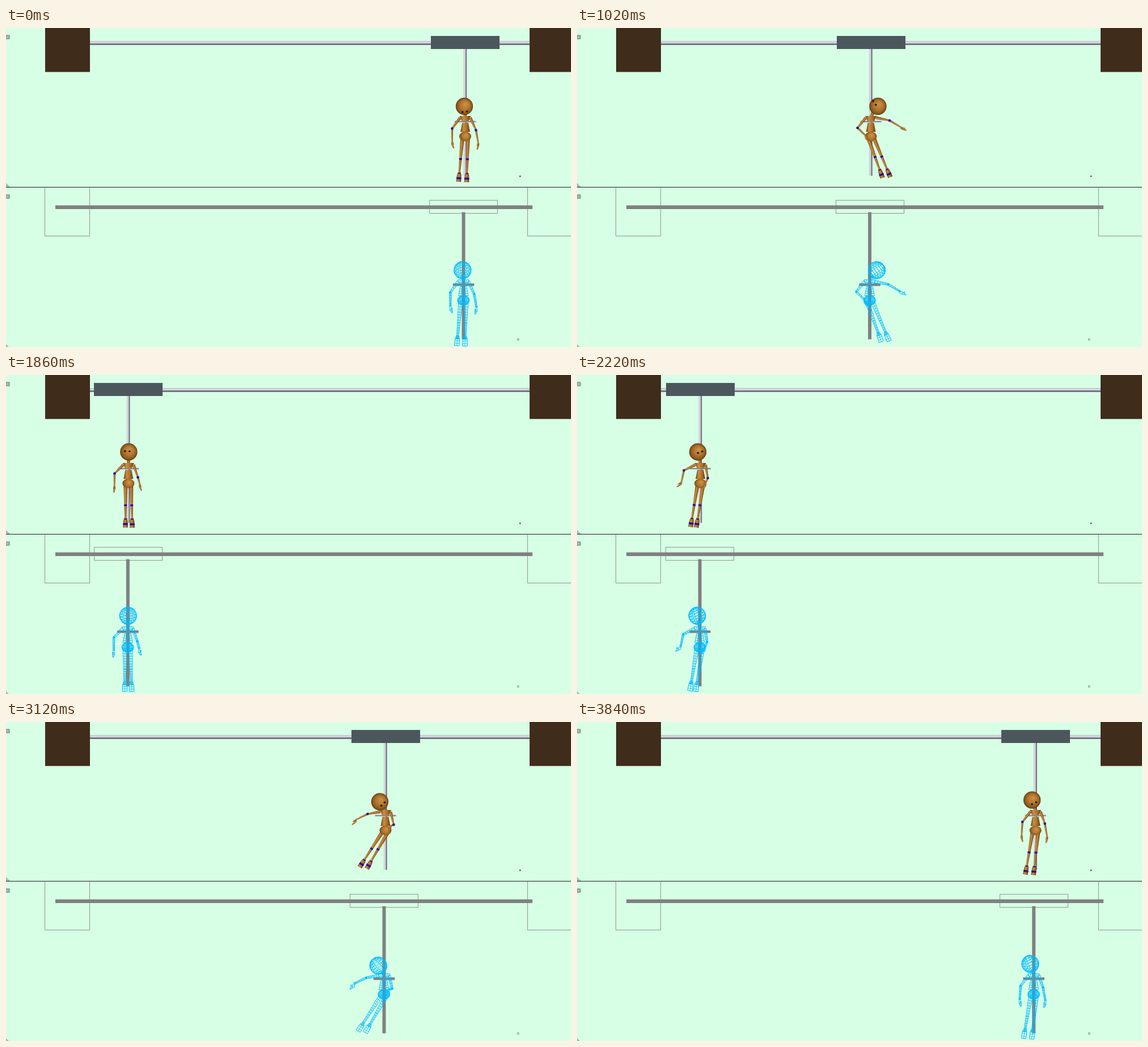
An HTML page with a canvas that plays this animation: 996 px wide and 562 px high, repeating every 3.9 s.

```html
<!DOCTYPE html>
<html lang="en">
<head>
<meta charset="utf-8">
<title>Puppet on a sliding carriage</title>
<style>
html, body { margin: 0; width: 100%; height: 100%; overflow: hidden; background: #d7ffe5; }
canvas { display: block; }
</style>
</head>
<body>
<canvas id="stage" width="996" height="562"></canvas>
<script>
const ctx = document.getElementById('stage').getContext('2d');
const STEP = 60, STEPS = 65;
const GREY = '#808080', WIRE = '#00b9ff', PURPLE = '#2c0c9c';
const WOOD = ['#6f4514', '#c98d42', '#a96f2b', '#5f390f'];
const METAL = ['#a3a3ae', '#e9e9f4', '#c3c3cf', '#737380', '#676772'];

// Times are counted in steps of 60 ms.
const SLIDE = [[0, 809.5], [4, 808.6], [8, 792], [9, 782.5], [13, 702], [17, 518], [18, 437.5],
  [21, 311], [25, 235.5], [27, 224], [32, 215.3], [37, 217.5], [45, 265.5], [48, 377],
  [50, 530], [52, 669], [54, 749.5], [58, 800], [63, 807.5], [64, 808.2]];

// Per pose: head xy, face offset xy, left elbow xy, left wrist xy, left hand dx,
// right elbow xy, right wrist xy, right hand dx, left ankle xy, right ankle x.
const POSE_TIMES = [0, 8, 17, 25, 37, 52, 64];
const POSES = [
  [-1.5, 138, 0.7, 9.5, -23, 177, -23, 201, 3, 19, 180, 23, 203, -2, -10.5, 257, 3],
  [4.5, 141.5, -6.5, 9.5, -20.5, 177, -9, 189, 5, 26.5, 174, 29.5, 195, 9, 0.5, 256, 14.5],
  [12.5, 138, -6, -6, -23.5, 176, -9, 190, 5, 33, 163, 53, 175, 10, 16, 251, 29],
  [6.5, 135.5, -8.5, -3, -20.5, 177.5, -16.5, 200, 6, 23.5, 177, 37.5, 194, 11, 4.5, 255, 18],
  [-4.5, 135.5, 4, 0.5, -29, 168, -33.5, 189, -8, 13, 181.5, 9, 191, -5, -15, 254, -5],
  [-10, 140.5, 5.5, 4, -31.5, 162, -52, 172, -7, 14.5, 181, 9, 183, -5, -38, 244, -26],
  [-6, 137.5, 3.5, 5.5, -23, 176, -24.5, 200, 2, 16.5, 179, 20.5, 202, -2, -15.5, 255, -2]
];

// Monotone cubic through the points, at rest at both ends.
function curve(times, values, t) {
  const slope = i => (values[i + 1] - values[i]) / (times[i + 1] - times[i]);
  const tangent = i => {
    if (i === 0 || i === times.length - 1) return 0;
    const a = slope(i - 1), b = slope(i);
    return a * b <= 0 ? 0 : 2 * a * b / (a + b);
  };
  let i = 0;
  while (i < times.length - 2 && t > times[i + 1]) i++;
  const span = times[i + 1] - times[i], u = (t - times[i]) / span, v = 1 - u;
  return v * v * (1 + 2 * u) * values[i] + u * u * (3 - 2 * u) * values[i + 1]
    + span * u * v * (v * tangent(i) - u * tangent(i + 1));
}

function rect(x, y, w, h, fill) {
  ctx.fillStyle = fill;
  ctx.fillRect(x, y, w, h);
}

function outline(x, y, w, h) {
  ctx.strokeStyle = '#8b9a91';
  ctx.lineWidth = 1;
  ctx.strokeRect(x, y, w, h);
}

function line(points, color, width) {
  ctx.strokeStyle = color;
  ctx.lineWidth = width;
  ctx.beginPath();
  points.forEach(p => ctx.lineTo(...p));
  ctx.stroke();
}

function ramp(x0, y0, x1, y1, colors) {
  const g = ctx.createLinearGradient(x0, y0, x1, y1);
  colors.forEach((c, i) => g.addColorStop(i / (colors.length - 1), c));
  return g;
}

const mix = (a, b, u) => [a[0] + (b[0] - a[0]) * u, a[1] + (b[1] - a[1]) * u];

// Tapered segment from a to b, shaded or as a mesh.
function limb(a, b, wa, wb, wire, colors = WOOD) {
  const dx = b[0] - a[0], dy = b[1] - a[1], len = Math.hypot(dx, dy) || 1;
  const nx = dy / len / 2, ny = -dx / len / 2;
  const side = (u, s) => {
    const p = mix(a, b, u), w = (wa + (wb - wa) * u) * s;
    return [p[0] + nx * w, p[1] + ny * w];
  };
  const shape = [side(0, -1), side(0, 1), side(1, 1), side(1, -1), side(0, -1)];
  if (!wire) {
    const w = Math.max(wa, wb);
    ctx.fillStyle = ramp(a[0] - nx * w, a[1] - ny * w, a[0] + nx * w, a[1] + ny * w, colors);
    ctx.beginPath();
    shape.forEach(p => ctx.lineTo(...p));
    ctx.fill();
    return;
  }
  line(shape, WIRE, 1);
  const columns = Math.max(2, Math.round(Math.max(wa, wb) / 4)), rows = Math.ceil(len / 5);
  for (let i = 1; i < columns; i++) {
    const s = 2 * i / columns - 1;
    line([side(0, s), side(1, s)], WIRE, 0.8);
  }
  for (let i = 1; i < rows; i++) line([side(i / rows, -1), side(i / rows, 1)], WIRE, 0.8);
}

function ball(x, y, rx, ry, tilt, pitch, wire) {
  ctx.save();
  ctx.translate(x, y);
  const ellipse = (cy, a, b) => {
    ctx.beginPath();
    ctx.ellipse(0, cy, Math.abs(a), Math.abs(b), 0, 0, 7);
  };
  if (wire) {
    ctx.rotate(tilt);
    ctx.strokeStyle = WIRE;
    ctx.lineWidth = 0.8;
    for (let i = 0; i < 6; i++) {
      ellipse(0, rx * Math.cos(i * Math.PI / 12), ry);
      ctx.stroke();
    }
    for (let i = -4; i <= 4; i++) {
      const lat = i * Math.PI / 10, r = Math.cos(lat);
      ellipse(ry * Math.sin(lat) * Math.cos(pitch), rx * r, ry * r * Math.sin(pitch));
      ctx.stroke();
    }
  } else {
    const g = ctx.createRadialGradient(rx * 0.15, -ry * 0.25, 1, 0, 0, rx);
    g.addColorStop(0, '#cb8f45');
    g.addColorStop(0.5, '#b1762f');
    g.addColorStop(0.85, '#8a581d');
    g.addColorStop(1, '#5d390f');
    ctx.fillStyle = g;
    ellipse(0, rx, ry);
    ctx.fill();
  }
  ctx.restore();
}

function dot(p, r, color) {
  ctx.fillStyle = color;
  ctx.beginPath();
  ctx.arc(p[0], p[1], r, 0, 7);
  ctx.fill();
}

function leg(hip, ankle, wire) {
  const knee = mix(hip, ankle, 0.59);
  const length = Math.hypot(ankle[0] - knee[0], ankle[1] - knee[1]);
  const along = d => mix(knee, ankle, 1 + d / length);
  limb(hip, knee, 7, 4.5, wire);
  limb(knee, ankle, 4.5, 3, wire);
  limb(along(-3), along(2), 5, 7, wire);
  limb(along(1), along(14), 7.5, 8.5, wire);
  if (wire) return;
  limb(mix(hip, ankle, 0.565), mix(hip, ankle, 0.615), 5, 5, false, [PURPLE, PURPLE]);
  limb(along(-2), along(0), 4, 4, false, [PURPLE, PURPLE]);
  limb(along(6), along(9.5), 8.5, 8.5, false, [PURPLE, PURPLE]);
}

function arm(shoulder, elbow, wrist, handX, wire) {
  const handY = Math.sqrt(Math.max(9, 132 - handX * handX));
  const tip = [wrist[0] + handX, wrist[1] + handY];
  const bend = [wrist[0] + handX * 0.25, wrist[1] + handY * 0.5];
  const thumb = [wrist[0] + handX * 0.8, wrist[1] + handY * 0.4];
  limb(shoulder, elbow, 5, 3, wire);
  limb(elbow, wrist, 3.5, 2.5, wire);
  if (wire) {
    [[wrist, 1.5], [bend, 2], [mix(bend, tip, 0.5), 1.5], [tip, 1], [thumb, 1]].forEach(([p, r]) => {
      ctx.strokeStyle = WIRE;
      ctx.lineWidth = 0.8;
      ctx.strokeRect(p[0] - r, p[1] - r, 2 * r, 2 * r);
    });
    dot(elbow, 2, WIRE);
    return;
  }
  limb(wrist, bend, 3.5, 4, false);
  limb(bend, tip, 3, 2, false);
  limb(wrist, thumb, 2, 1.5, false);
  dot(elbow, 2.3, PURPLE);
}

function puppet(x, y, pose, wire) {
  const [hx, hy, fx, fy, elx, ely, wlx, wly, handL, erx, ery, wrx, wry, handR, alx, aly, arx] = pose;
  const tilt = hx * 0.075;
  ctx.save();
  ctx.translate(x, y);
  leg([-5, 193], [alx, aly], wire);
  leg([5, 193], [arx, aly - alx * 0.06], wire);
  limb([hx * 0.4, hy + 10], [0, 157], 5, 5, wire);
  limb([0, 155], [0, 164], 20, 12, wire);
  limb([0, 167], [0, 183], 11, 17, wire);
  ball(0, 191, 10.5, 8.5, 0, 0.25, wire);
  arm([-9, 158], [elx, ely], [wlx, wly], handL, wire);
  arm([9, 158], [erx, ery], [wrx, wry], handR, wire);
  ball(hx, hy, 15.2, 15.2, tilt, 0.25 + Math.abs(fy) * 0.04, wire);
  if (!wire) {
    const ex = 4 * Math.cos(tilt), ey = 4 * Math.sin(tilt);
    dot([hx + fx - ex, hy + fy - ey], 1.8, '#1c1206');
    dot([hx + fx + ex, hy + fy + ey], 1.8, '#1c1206');
  }
  ctx.restore();
}

function panelMarks(badgeY, cornerY) {
  ctx.fillStyle = '#96a89d';
  ctx.beginPath();
  ctx.roundRect(-3, badgeY, 10, 8, 2);
  ctx.fill();
  rect(1, badgeY + 3, 3, 2, '#b3c8bc');
  for (let i = 2; i <= 6; i += 2) line([[0, cornerY - i], [i, cornerY]], '#56635c', 0.8);
}

function draw(step) {
  const x = curve(SLIDE.map(k => k[0]), SLIDE.map(k => k[1]), step);
  const pose = POSES[0].map((_, i) => curve(POSE_TIMES, POSES.map(p => p[i]), step));
  const left = Math.round(x - 60.3);
  const lowX = x * 0.9966 - 0.2, lowLeft = Math.round(lowX - 60.3);

  rect(0, 0, 996, 562, '#d7ffe5');

  // Shaded view
  rect(148, 23, 775, 7, ramp(0, 23, 0, 30, METAL));
  rect(69, 0, 79, 77.5, '#402c1a');
  rect(923, 0, 73, 77.5, '#402c1a');
  rect(x - 2.7, 37, 5.4, 223.5, ramp(x - 2.7, 0, x + 2.7, 0, METAL));
  rect(x - 18.5, 162.5, 37, 3.5, ramp(0, 162, 0, 166, METAL));
  rect(left, 14, 121, 23, '#4b575d');
  puppet(x, 0, pose, false);
  rect(905, 260, 2.5, 2.5, '#4d5b53');
  panelMarks(12, 280);
  rect(0, 280, 996, 1, '#18201b');

  // Mesh view
  outline(68.5, 280.5, 79, 86);
  outline(919.5, 280.5, 90, 86);
  outline(lowLeft + 0.5, 303.5, 120, 23);
  rect(87, 312.5, 841, 6.5, GREY);
  rect(lowX - 3, 324.5, 6, 224, GREY);
  rect(lowX - 18.7, 450, 37.5, 4.5, GREY);
  puppet(lowX - 0.2, 288.7, pose, true);
  outline(901.5, 547.5, 2.5, 2.5);
  panelMarks(293, 564);
  rect(0, 280, 996, 1, '#18201b');
}

function play(now) {
  draw(Math.floor(now / STEP) % STEPS);
  requestAnimationFrame(play);
}
play(performance.now());
</script>
</body>
</html>
```
